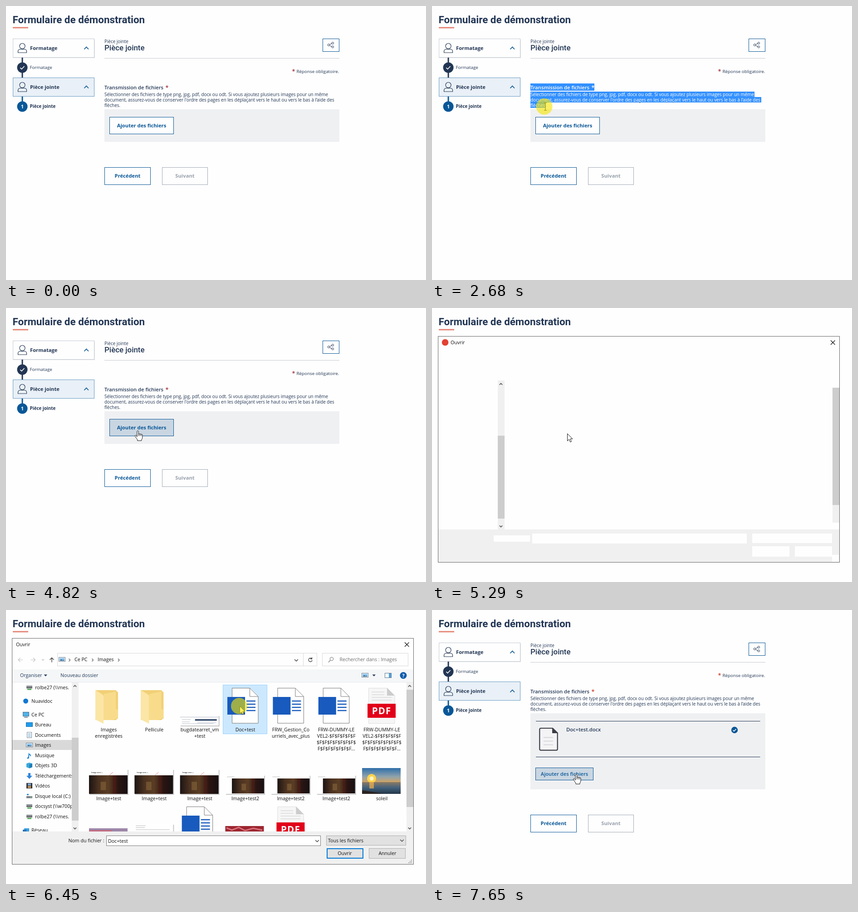
An HTML page that plays this animation: 926 by 605 pixels, repeating every 8 s.

```html
<!DOCTYPE html>
<html lang="fr">
<head>
<meta charset="utf-8">
<title>Formulaire de démonstration</title>
<style>
html, body { margin: 0; width: 100%; height: 100%; overflow: hidden; background: #fefefe; }
svg { display: block; width: 100vw; height: 100vh; font-family: "Open Sans", sans-serif; }
text { white-space: pre; }
.r { font-family: Roboto, sans-serif; }
</style>
</head>
<body>
<svg id="stage" viewBox="0 0 926 605"></svg>
<script>
const NAVY = '#223654', BLUE = '#095797', HOVER = [201, 214, 226];

// Markup helpers
const text = (x, y, s, size, fill = NAVY, more = '') =>
  `<text x="${x}" y="${y}" font-size="${size}" fill="${fill}" ${more}>${s}</text>`;
const box = (x, y, w, h, fill, stroke = 'none', more = '') =>
  `<rect x="${x}" y="${y}" width="${w}" height="${h}" fill="${fill}" stroke="${stroke}" ${more}/>`;
const line = (d, stroke, w = 1, more = '') =>
  `<path d="${d}" fill="none" stroke="${stroke}" stroke-width="${w}" ${more}/>`;
const shape = (d, fill) => `<path d="${d}" fill="${fill}"/>`;
const disc = (x, y, r, fill) => `<circle cx="${x}" cy="${y}" r="${r}" fill="${fill}"/>`;
const group = (id, s, more = '') => `<g id="${id}" ${more}>${s}</g>`;
const BOLD = 'font-weight="700"', SEMI = 'font-weight="600"', MID = 'text-anchor="middle"';

// ---- Form page ----
const person = y =>
  `<circle cx="36" cy="${y - 4.5}" r="6" fill="none" stroke="${NAVY}" stroke-width="1.2"/>` +
  line(`M26.5 ${y + 10}v-2.5q0-5 5-5h9q5 0 5 5v2.5z`, NAVY, 1.2, 'stroke-linejoin="round"');

const card = (y, label, fill, edge) =>
  box(15.5, y + .5, 179, 41, fill, edge) + person(y + 21) +
  text(53, y + 25, label, 11.2, NAVY, BOLD) +
  line(`M172.5 ${y + 23.5}l4.7-5 4.7 5`, BLUE, 1.8);

const sidebar = () =>
  box(16, 74, 180, 41, '#e3e5e9') + card(72, 'Formatage', '#fefefe', '#c5cad2') +
  box(34.5, 114, 3, 44, NAVY) + disc(36, 136, 11.5, NAVY) +
  line('M31.5 136.3l3 3 6-6.3', '#fff', 1.7) + text(52.5, 139, 'Formatage', 9.8) +
  card(158, 'Pièce jointe', '#e9f0f7', '#6a9bc2') +
  box(34.5, 200, 3, 12, BLUE) + disc(36, 222, 11.5, BLUE) +
  text(36, 226, '1', 11, '#fff', BOLD + MID) + text(52.5, 225, 'Pièce jointe', 9.8, NAVY, BOLD);

const intro = (fill, star) =>
  text(217, 184, 'Transmission de fichiers', 11.2, fill, SEMI) +
  text(351.5, 185, '*', 12.5, star, SEMI + 'class="star"') +
  ['Sélectionner des fichiers de type png, jpg, pdf, docx ou odt. Si vous ajoutez plusieurs images pour un même',
   "document, assurez-vous de conserver l'ordre des pages en les déplaçant vers le haut ou vers le bas à l’aide des",
   'flèches.'].map((s, i) => text(217, 199 + i * 11.8, s, 9.88, fill)).join('');

const rows = [[171, 16, 358], [189, 12, 711], [201, 12, 726], [213, 12, 255]];

const navButton = (x, w, label, edge, ink) =>
  box(x + .5, 356.5, w, 38, '#fefefe', edge) +
  text(x + .5 + w / 2, 379, label, 11.2, ink, BOLD + MID);

const page = () =>
  sidebar() +
  text(217, 81.5, 'Pièce jointe', 9.88) +
  text(217, 98, 'Pièce jointe', 16.9, NAVY, 'class="r" font-weight="500"') +
  box(698.5, 72.5, 36, 28, '#fefefe', BLUE) +
  line('M713.5 85.2l5-2.6M713.5 87.2l5 2.6', NAVY) +
  [[711.5, 86], [720.3, 82], [720.3, 90.3]].map(p =>
    `<circle cx="${p[0]}" cy="${p[1]}" r="2.2" fill="none" stroke="${NAVY}"/>`).join('') +
  line('M217 115.5H735', '#c5cad2') +
  text(630.5, 149, '*', 12.5, '#a02a35', SEMI + 'class="star"') +
  text(734.5, 148, 'Réponse obligatoire.', 9.85, NAVY, 'text-anchor="end"') +
  intro(NAVY, '#a02a35') +
  group('select', box(217, 171, 520, 56, '#3390ff') + intro('#fff', '#fff'), 'clip-path="url(#picked)"') +
  box(217, 228, 518, 72, '#eff0f2', 'none', 'id="panel"') +
  group('add', box(228.5, 245.5, 141, 37, '#fefefe', BLUE, 'id="addFill"') +
    text(299, 267.5, 'Ajouter des fichiers', 11.2, BLUE, BOLD + MID)) +
  group('row',
    line('M229 245.5H723.5', NAVY) + line('M229 324.5H723.5', NAVY, 1, 'id="rule"') +
    shape('M239 261h28l10 10v36q0 3-3 3h-35q-2 0-2-3v-43q0-3 2-3z', '#f4f4f6') +
    line('M240 261h26l10.7 10.5V307q0 2.7-2.7 2.7h-34q-2.7 0-2.7-2.7v-43.3q0-2.7 2.7-2.7z', '#3b3c46', 2.2) +
    shape('M265 261v11h11.5z', '#3b3c46') +
    line('M246 281.5h21M246 289.5h21M246 297.5h21', '#d5d6de', 1.8) +
    text(296, 267.5, 'Doc+test.docx', 11.2, NAVY, SEMI) +
    group('done', disc(667, 265, 7.2, BLUE) + line('M663.5 265.2l2.4 2.4 4.6-4.8', '#fff', 1.5, 'id="tick"')) +
    group('again', box(228.5, 348.5, 127, 27, '#fefefe', BLUE, 'id="againFill"') +
      text(292, 366, 'Ajouter des fichiers', 11.2, BLUE, SEMI + MID))) +
  group('nav', navButton(217, 101, 'Précédent', BLUE, BLUE) +
    navButton(344, 100, 'Suivant', '#a3abb6', '#98a1ad'));

// ---- File dialog ----
const F = 10.6, INK = '#111';
const say = (x, y, s, fill = INK, more = '') => text(x, y + 3.8, s, F, fill, more);
const chevron = (x, y, dir = 1, r = 3.2, ink = '#555', w = 1.5) =>
  line(`M${x - r} ${y - dir * r / 2}l${r} ${dir * r} ${r} ${-dir * r}`, ink, w);
const next = (x, more = '') => line(`M${x - 1.5} 107.5l3 3-3 3`, '#555', 1.1, more);
const picIcon = (x, y) => box(x + .5, y + .5, 14, 9, '#fff', '#6d7f91') +
  box(x + 2, y + 2, 11, 6, '#8cc5ef') + shape(`M${x + 2} ${y + 8}l4-3 3 2 2-1 2 2z`, '#2d5f87');

const shell = () =>
  box(13.5, 62.5, 885, 499, '#fefefe', '#666') + box(14, 489, 884, 72, '#f0f0f0') +
  line('M879 71.5l9.5 9.5M888.500 71.5l-9.5 9.5', INK, 1.2) +
  group('caption', disc(29, 76, 7.3, '#e34133') + say(41, 76.5, 'Ouvrir')) +
  box(145, 160, 15, 329, '#f0f0f0') + box(145, 282, 15, 183, '#cdcdcd') +
  chevron(152, 168, -1) + chevron(152, 482) +
  box(883, 435, 15, 39, '#f0f0f0') + box(883, 176, 15, 259, '#cdcdcd') +
  box(136, 502, 80, 14, '#fefefe') + box(221, 498, 473, 22, '#fefefe') +
  box(706, 498, 176, 21, '#fefefe') + box(706, 526, 82, 23, '#fefefe') +
  box(800, 526, 82, 23, '#fefefe') + box(882, 545, 15, 15, '#fefefe');

// Small icons of the folder tree, 14 px wide
const icons = {
  drive: y => box(45, y - 4, 13, 4, '#8a8f94') + box(45, y, 13, 2, '#555') + box(47, y + 3, 9, 2.5, '#3fa648'),
  disk: y => box(45, y, 13, 4.5, '#777d84') + box(46, y - 5, 4, 3, '#2f8fd8') + box(54, y + 1.5, 2.5, 1.5, '#7fe07f'),
  cloud: y => disc(43.5, y, 5.5, '#1177d1'),
  pc: y => box(37.5, y - 5.5, 13, 9, '#4fb2ea', '#4b6b85') + box(40, y + 5, 8, 1.5, '#4b6b85'),
  desk: y => box(44.5, y - 4.500, 14, 9, '#1f9bea', '#1a6fb0'),
  doc: y => box(46.5, y - 6, 10, 12, '#fff', '#7b8794') + line(`M48.5 ${y - 2.5}h6m-6 3h6m-6 3h6`, '#4d9cd6'),
  pic: y => picIcon(44, y - 5),
  music: y => shape(`M50 ${y - 6}q1 3 4 4 2 2 0 5 0-3-3-4v6q-1 3-4 2.500-1-3 2-4z`, '#1a83d4'),
  cube: y => shape(`M45 ${y - 4}l6.5-2 6.500 2v8l-6.5 2.500-6.5-2.500z`, '#39a9dd') + shape(`M51.5 ${y - 2}l6.500-2v8l-6.5 2.500z`, '#1f7fb5'),
  down: y => shape(`M49 ${y - 6}h5v6h4l-6.500 7-6.5-7h4z`, '#2f86dc'),
  film: y => box(45, y - 6, 13, 12, '#333') + box(48, y - 5, 7, 4.500, '#7aa7d8') + box(48, y + .5, 7, 4.5, '#c5955d'),
  net: y => box(40, y - 4, 11, 7, '#3d9ee0') + box(37, y - 1, 8, 6, '#2772b5')
};
const tree = [
  ['drive', 171, 'rolbe27 (\\\\mes.'], ['cloud', 201, 'Nuavidoc', 56], ['pc', 231, 'Ce PC', 56],
  ['desk', 253, 'Bureau'], ['doc', 276, 'Documents'], ['pic', 298, 'Images'], ['music', 321, 'Musique'],
  ['cube', 343, 'Objets 3D'], ['down', 366, 'Téléchargements'], ['film', 388, 'Vidéos'],
  ['disk', 411, 'Disque local (C:)'], ['drive', 433, 'docsyst (\\\\w700p'],
  ['drive', 456, 'rolbe27 (\\\\mes.'], ['net', 486, 'Réseau', 56]];

// Large thumbnails: c is the column centre, y the vertical shift
const sheet = (c, y) => shape(`M${c - 29} ${172 + y}h40l18 18v60h-58z`, '#fff') +
  line(`M${c - 28.5} ${172.5 + y}h39l18.500 18.500v59h-57.5z`, '#777') +
  line(`M${c + 10.5} ${173 + y}v18h18`, '#777');
const word = (c, y) => sheet(c, y) +
  line([201, 208, 215, 222].map(v => `M${c + 3} ${v + y}h20`).join(''), '#185abd', 2.4) +
  box(c - 39, 192 + y, 39, 39, '#185abd');
const pdf = (c, y) =>
  shape(`M${c - 29} ${172 + y}h42l16 17v62h-58z`, '#f6f6f6') +
  line(`M${c - 28.5} ${172.5 + y}h41l16.500 17v61h-57.5z`, '#ddd') +
  shape(`M${c + 12} ${172 + y}v17h17z`, '#ccc') +
  line([181, 187, 193, 199].map((v, i) => `M${c - 22} ${v + y}h${i < 2 ? 28 : 44}`).join(''), '#ccc') +
  box(c - 31, 207 + y, 62, 31, '#e2001a') +
  text(c, 230 + y, 'PDF', 20.5, '#fff', BOLD + MID + ' letter-spacing="1.2"');
const folder = c =>
  shape(`M${c - 29} 177h45l5 5v57l-5 4h-45z`, '#f2d077') +
  shape(`M${c - 29} 177l15 9q3 2 3 5v60l-18-9z`, '#fbe6a6') +
  shape(`M${c - 11} 186l27-6v38l5 3v17l-12 5h-20z`, '#f8dc8c');
const frame = (c, y, h) => box(c - 42, y + 1, 86, h + 1, '#c9c9c9') + box(c - 43, y, 85, h, '#fff');
const room = (x, y, w, h) => box(x, y, w, h, 'url(#dark)') +
  box(x + w * .3, y + h * .35, w * .14, h * .45, '#8a6a3c', 'none', 'opacity=".55"') +
  box(x + w * .62, y, w * .08, h, '#4a1a14', 'none', 'opacity=".7"');
const wide = c => frame(c, 352, 54) + text(c - 38, 360, 'Image avec +', 4, '#222', SEMI) +
  line(`M${c + 2} 365l8-7`, '#e06060', .8) + room(c - 43, 365, 85, 41);
const low = c => frame(c, 365, 41) + line(`M${c - 40} 368.500h16`, '#bbb') + room(c - 29, 372, 71, 33);
const sunset = c => box(c - 43, 349, 85, 57, 'url(#sky)') + disc(c - 22, 372, 10, '#ffd34a') +
  disc(c - 22, 372, 4.500, '#fff6c8') + box(c - 43, 380, 85, 26, 'url(#sea)') +
  box(c - 27, 380, 10, 14, '#ffb74a', 'none', 'opacity=".65"') + shape(`M${c - 43} 406v-8l26 4 20 4z`, '#2b2320');
const shot = c => frame(c, 233, 22) + box(c - 43, 235, 85, 3, '#e3e5ea') + box(c - 10, 241, 48, 3.5, '#33496b') +
  line(`M${c - 39} 242h20m-20 5h18m16 2h42M${c - 39} 251h70`, '#b9bec9');

const col = i => 226 + i * 100.35;
const long = ['FRW-DUMMY-LE', 'VEL2-$F$F$F$F$F', '$F$F$F$F$F$F$F$', 'F$F$F$F$F$F$F...'];
const files = [
  [folder, 'Images', 'enregistrées'], [folder, 'Pellicule'], [shot, 'bugdatearret_vm', '+test'],
  [word, 'Doc+test'], [word, 'FRW_Gestion_Co', 'urriels_avec_plus'], [word, ...long], [pdf, ...long],
  [wide, 'Image+test'], [wide, 'Image+test'], [wide, 'Image+test'],
  [low, 'Image+test2'], [low, 'Image+test2'], [low, 'Image+test2'], [sunset, 'soleil']];

const grid = () => files.map(([draw, ...label], i) => {
  const c = col(i % 7), y = i < 7 ? 264.5 : 416.5;
  return draw(c, 0) + label.map((s, k) => say(c + .5, y + k * 14, s, INK, MID)).join('');
}).join('') +
  box(183, 482, 85, 10, '#9c86a8') + box(183, 486, 50, 6, '#c46a80') +
  frame(col(1), 473, 20) + line('M286 476.5h22m-22 4h20M286 485h75', '#bbb') +
  word(col(2), 262) + box(483.5, 477, 85, 14, '#9c2630') +
  line('M486 481l12 5 15-6 14 7 18-5 20 4', '#d9707a', 3) + pdf(col(4), 262);

const content = () =>
  say(22, 76.5, 'Ouvrir') +
  line('M37 110H27m4.500-4.500l-4.5 4.5 4.500 4.5M54.500 110h10m-4.5-4.500l4.500 4.5-4.5 4.500', '#c4c4c4', 1.2) +
  chevron(81.500, 110, 1, 2.5, '#bbb', 1.2) + line('M101 115.500V105.500m-4.5 4.500l4.500-4.500 4.500 4.500', '#444', 1.4) +
  box(113.5, 95.5, 572, 28, '#fefefe', '#d9d9d9') + line('M655.5 96v27', '#d9d9d9') +
  picIcon(116, 104) + next(140) + say(151, 109.5, 'Ce PC') + next(191) + say(202, 109.5, 'Images') +
  next(248.500, 'id="last"') + chevron(640, 111, 1, 3.8) +
  line('M674 107.500a4 4 0 1 0 1 3.500M674.500 104.500v3.500h-3.500', '#444', 1.3) +
  box(697.5, 95.5, 189, 28, '#fefefe', '#d9d9d9') +
  '<circle cx="718" cy="108" r="3.8" fill="none" stroke="#777"/>' + line('M715 111l-4 4.500', '#777', 1.2) +
  say(735.5, 109.5, 'Rechercher dans : Images', '#6d6d6d') +
  box(14, 131, 884, 28, '#f5f6f7') + line('M14 159.5H898', '#e6e8ea') +
  say(31, 144, 'Organiser', '#1e395b') + shape('M83.5 142.500h7.500l-3.75 4z', '#1e395b') +
  say(120, 144, 'Nouveau dossier', '#1e395b') +
  picIcon(784, 139) + shape('M807.5 142.500h7.500l-3.75 4z', '#1e395b') +
  box(835.5, 139.5, 14, 10, '#fff', '#5a7793') + box(844, 140, 5, 9, '#4fa3e0') +
  disc(876, 144.5, 7.5, '#0d5cab') + text(876, 148.500, '?', 11, '#fff', BOLD + MID) +
  group('', box(14, 287, 131, 22, '#d9d9d9') +
    tree.map(([k, y, s, x = 64]) => icons[k](y) + say(x, y, s)).join(''), 'clip-path="url(#left)"') +
  box(883, 160, 15, 16, '#f0f0f0') + box(883, 435, 15, 54, '#f0f0f0') +
  chevron(890, 168, -1) + chevron(890, 482) +
  group('list', box(478.5, 165.5, 97, 108, '#e5f3ff', 'none', 'id="mark"') + group('thumbs', grid()),
    'clip-path="url(#right)"') +
  box(136, 500, 84, 18, '#f0f0f0') + say(216.5, 509, 'Nom du fichier :', INK, 'text-anchor="end"') +
  box(221.5, 498.5, 472, 22, '#fff', '#7a7a7a') + group('name', say(225, 510, 'Doc+test')) + chevron(686, 510, 1, 3.8) +
  box(706.5, 498.5, 175, 21, '#e1e1e1', '#adadad') + say(710, 509, 'Tous les fichiers') + chevron(873, 509, 1, 3.8) +
  box(706, 526, 176, 24, '#f0f0f0') + box(882, 545, 15, 15, '#f0f0f0') +
  box(708, 527, 79, 21, '#e1e1e1', '#0078d7', 'stroke-width="2"') + say(747, 537.5, 'Ouvrir', INK, MID) +
  box(800.5, 526.5, 80, 22, '#e1e1e1', '#adadad') + say(841, 537.5, 'Annuler', INK, MID) +
  line('M893 552h2M890 555h2m1 0h2M887 558h2m1 0h2m1 0h2', '#aaa', 2);

// ---- Pointers, hot spot at 0,0 ----
const pointers =
  group('arrow', '<path d="M.5.5v16l3.700-3.500 2.700 6 2.600-1.100-2.600-5.900h5z" fill="#fff" stroke="#111" stroke-linejoin="round"/>') +
  group('beam', line('M-3-8.500q3 0 3 1.500 0-1.500 3-1.500M0-7V7M-3 8.500q3 0 3-1.500 0 1.500 3 1.500', '#222', 1.2)) +
  group('hand', '<path d="M-1.800 1q0-1.700 1.600-1.700T1.500 1v6.500q0-1.500 1.500-1.500t1.500 1.500q0-1.200 1.500-1.200T7.500 8q0-1 1.200-1T10 8.800V14q0 3-2 5v2.200H-1V19q-2-2.500-5-7.500-1-1.800.500-2.300 1.200-.3 2.200 1.300l1.500 2z" fill="#fff" stroke="#111" stroke-linejoin="round"/>' +
    line('M1.500 7.500v3.500M4.500 7.500v3.500M7.500 8v3', '#111'));

const grad = (id, x2, y2, ...stops) => `<linearGradient id="${id}" x2="${x2}" y2="${y2}">` +
  stops.map((c, i) => `<stop offset="${i / (stops.length - 1)}" stop-color="${c}"/>`).join('') + '</linearGradient>';

const stage = document.getElementById('stage');
stage.innerHTML = '<defs>' +
  grad('dark', 1, 0, '#1c1412', '#4a3120', '#5b3d24', '#2a1512', '#171012') +
  grad('sky', 0, 1, '#2f6ea8', '#8fa3ad', '#f5a33a', '#f08a1e') +
  grad('sea', 0, 1, '#8a7a66', '#40607c', '#243545') +
  '<clipPath id="picked">' + rows.map(([y, h]) => `<rect x="217" y="${y}" width="0" height="${h}"/>`).join('') + '</clipPath>' +
  '<clipPath id="left">' + box(14, 160, 131, 329, '#000') + '</clipPath>' +
  '<clipPath id="right">' + box(160, 160, 723, 329, '#000') + '</clipPath></defs>' +
  box(0, 0, 926, 605, '#fefefe') +
  text(14.5, 37.5, 'Formulaire de démonstration', 22.4, NAVY, 'class="r" ' + BOLD) +
  box(15, 46.5, 34, 2.800, '#e58271') +
  page() + group('dialog', shell() + group('content', content())) +
  group('pointer', pointers) +
  '<circle id="halo" r="18" fill="#f7e600" opacity=".6"/>';

const $ = id => document.getElementById(id);
const show = (id, on) => $(id).setAttribute('display', on ? 'inline' : 'none');
const set = (id, o) => { for (const k in o) $(id).setAttribute(k, o[k]); };
const ramp = (t, a, b) => Math.min(1, Math.max(0, (t - a) / (b - a)));
const within = (t, a, b) => t >= a && t < b;
const tint = k => `rgb(${HOVER.map(v => Math.round(254 + (v - 254) * k))})`;

// Pointer path: time, x, y
const path = [
  [410, 836, 563], [470, 600, 345], [530, 406, 171], [930, 406, 171], [1080, 398, 176], [1320, 325, 223],
  [1530, 255, 200], [1710, 222, 180], [1830, 219, 179], [2320, 219, 179], [2470, 226, 194], [2640, 250, 222],
  [3300, 250, 222], [3500, 300, 232], [3640, 300, 232], [3890, 286, 245], [4060, 276, 261], [4660, 276, 261],
  [4900, 298, 277], [5840, 298, 277], [5990, 350, 255], [6200, 485, 217], [6330, 515, 212], [6700, 515, 212],
  [6960, 430, 280], [7330, 318, 363], [8000, 318, 363]];
const looks = [[0, 'arrow'], [1200, 'beam'], [1770, 'arrow'], [1830, 'beam'], [2010, 'arrow'], [2340, 'beam'],
  [3360, 'arrow'], [3960, 'hand'], [5150, 'arrow'], [6640, 'beam'], [6790, 'arrow'], [7300, 'hand']];
const clicks = [[2290, 2860], [3540, 3660], [4480, 4660], [6430, 6560]];

function place(t) {
  const i = Math.max(1, path.findIndex(p => p[0] > t));
  const [a, b] = [path[i - 1], path[i]], k = ramp(t, a[0], b[0]);
  return [a[1] + (b[1] - a[1]) * k, a[2] + (b[2] - a[2]) * k];
}

function draw(t) {
  const [x, y] = place(t);

  // Text selection follows the drag
  const chosen = within(t, 2340, 3540);
  show('select', chosen);
  const marks = $('picked').children;
  rows.forEach(([top, , end], i) => {
    const below = rows[i + 1] ? rows[i + 1][0] : 999;
    const to = y >= below ? end : y >= top - 2 ? Math.min(x, end) : 217;
    marks[i].setAttribute('width', chosen ? to - 217 : 0);
  });
  for (const s of document.querySelectorAll('.star'))
    if (!s.closest('#select')) s.setAttribute('fill', t < 6560 ? '#a02a35' : '#cb381f');

  // Upload area
  const sent = t >= 6850, extra = sent && t < 7250 ? 20 : 0, grow = sent ? 96 + extra : 0;
  show('add', !sent);
  show('row', sent);
  set('addFill', { fill: tint(t < 6500 ? ramp(t, 4060, 4240) : 0) });
  set('againFill', { fill: tint(ramp(t, 7300, 7460)) });
  set('panel', { height: 72 + grow });
  set('nav', { transform: `translate(0 ${grow})` });
  set('again', { transform: `translate(0 ${extra})` });
  set('rule', { transform: `translate(0 ${extra})` });
  show('done', t >= 7500);
  set('tick', { opacity: ramp(t, 7530, 7650) });

  // Dialog
  show('dialog', within(t, 5150, 6640));
  set('dialog', { opacity: Math.min(ramp(t, 5150, 5280), 1 - ramp(t, 6550, 6640)) });
  show('content', t >= 5350);
  show('caption', t < 5350);
  show('thumbs', t >= 5400);
  show('last', t >= 5530);
  const picked = t >= 6430, c = picked ? 3 : Math.floor((x - 177.500) / 100.35);
  show('mark', t >= 5400 && y < 274);
  set('mark', { x: 177.5 + c * 100.35, fill: picked ? '#cce8ff' : '#e5f3ff', stroke: picked ? '#99d1ff' : 'none' });
  show('name', picked);

  // Pointer and click halo
  const look = looks.filter(l => l[0] <= t).pop()[1];
  for (const id of ['arrow', 'beam', 'hand']) show(id, id === look);
  show('pointer', t >= 410);
  set('pointer', { transform: `translate(${x} ${y})` });
  show('halo', clicks.some(([a, b]) => within(t, a, b)));
  set('halo', { cx: x - (look === 'beam' ? 2.5 : 1), cy: y });
}

const start = performance.now();
function tick(now) {
  draw(Math.max(0, now - start) % 8000);
  requestAnimationFrame(tick);
}
draw(0);
requestAnimationFrame(tick);
</script>
</body>
</html>
```
